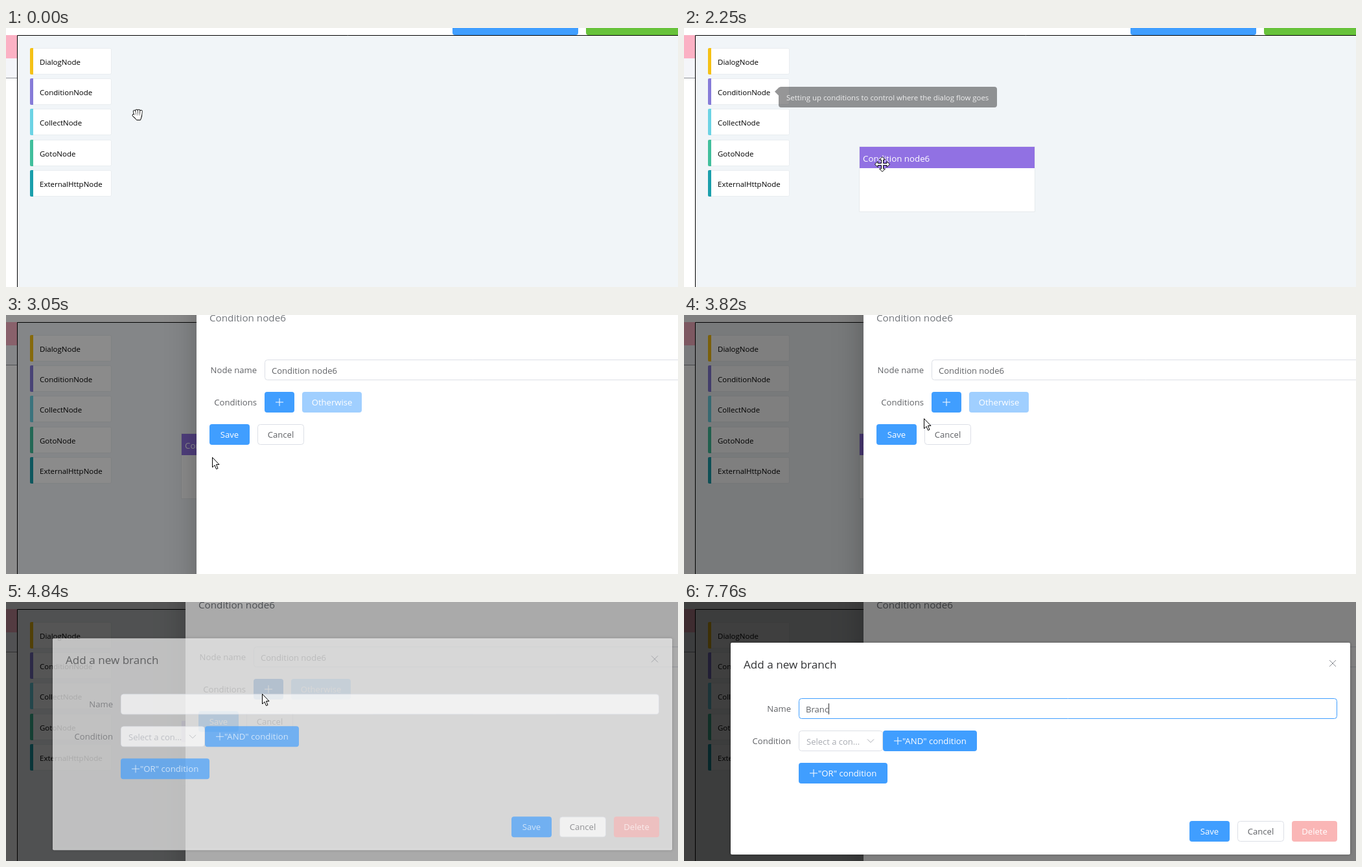
Animation of 1037x401 px, one loop 8 s. Source, as an HTML page with a canvas:

```html
<!DOCTYPE html>
<html lang="en">
<head>
<meta charset="utf-8">
<title>Flow editor</title>
<style>
html, body { margin: 0; width: 100%; height: 100%; overflow: hidden; background: #fff; }
canvas { display: block; width: 1037px; height: 401px; }
</style>
</head>
<body>
<canvas id="stage" width="1037" height="401"></canvas>
<script>
const W = 1037, H = 401, LOOP = 8000;
const ctx = document.getElementById('stage').getContext('2d');
const BLUE = '#409eff', HOVER = '#79bbff', PRESSED = '#337ecc', LINE = '#dcdfe6';
const GREY = '#606266', PALE = '#a8abb2', INK = '#303133', PURPLE = '#9171e3';
const NODES = {
  DialogNode: '#f5c116', ConditionNode: '#867bd8', CollectNode: '#6cd3e4',
  GotoNode: '#41bf9c', ExternalHttpNode: '#1a9fac'
};
const REST = { x: 197, y: 132 };
const MOVES = [
  { from: 610, to: 820, x: 155, y: 114 },
  { from: 1170, to: 1290, x: 213, y: 139 },
  { from: 1290, to: 1640, x: 272, y: 183 },
  { from: 1910, to: 2600, x: 318, y: 220 },
  { from: 3150, to: 3550, x: 334, y: 186 },
  { from: 3600, to: 4220, x: 395, y: 142 },
  { from: 4900, to: 5390, x: 339, y: 164 }
];
const TYPED_AT = [6160, 6690, 7020, 7490, 7760];

const ramp = (t, from, to) => Math.max(0, Math.min(1, (t - from) / (to - from)));
const easeOut = (u, power = 2) => 1 - (1 - u) ** power;
const between = (t, from, to) => t >= from && t < to;
const mix = (a, b, k) => a + (b - a) * k;

function rect(x, y, w, h, color) {
  ctx.fillStyle = color;
  ctx.fillRect(x, y, w, h);
}

function box(x, y, w, h, fill, border, r = 4) {
  const inset = border ? 0.5 : 0;
  ctx.beginPath();
  ctx.roundRect(x + inset, y + inset, w - 2 * inset, h - 2 * inset, r);
  ctx.fillStyle = fill;
  ctx.fill();
  if (!border) return;
  ctx.lineWidth = 1;
  ctx.strokeStyle = border;
  ctx.stroke();
}

function text(str, x, y, size, color, align = 'left') {
  ctx.font = `${size}px "Open Sans", "Noto Sans", sans-serif`;
  ctx.textAlign = align;
  ctx.fillStyle = color;
  ctx.fillText(str, x, y);
}

function line(color, width, x, y, ...rest) {
  ctx.beginPath();
  ctx.moveTo(x, y);
  for (let i = 0; i < rest.length; i += 2) ctx.lineTo(rest[i], rest[i + 1]);
  ctx.lineWidth = width;
  ctx.strokeStyle = color;
  ctx.stroke();
}

function shadowed(blur, color, paint) {
  ctx.save();
  ctx.shadowBlur = blur;
  ctx.shadowColor = color;
  paint();
  ctx.restore();
}

function plus(x, y) {
  rect(x - 6, y - 0.5, 12, 1, '#fff');
  rect(x - 0.5, y - 6, 1, 12, '#fff');
}

function button(label, x, y, w, fill, color = '#fff', border) {
  box(x, y, w, 32, fill, border);
  text(label, x + w / 2, y + 21, 13.1, color, 'center');
}

function plusButton(label, x, y, w) {
  box(x, y, w, 32, BLUE);
  plus(x + 23, y + 16);
  text(label, x + 30, y + 21, 13.2, '#fff');
}

const label = (str, right, y) => text(str, right, y + 21, 13.1, GREY, 'right');

function paletteItem(name, color, x, y) {
  box(x, y, 126, 41, '#fff', '#e9edf0', 2);
  box(x, y, 5, 41, color, null, [2, 0, 0, 2]);
  text(name, x + 15, y + 26, 11.5, '#000');
}

function page() {
  rect(0, 0, W, H, '#fff');
  rect(0, 11, 17, 36, '#fbb1c4');
  rect(0, 47, 17, 30, '#f4f5f9');
  rect(0, 77, 17, 1, '#8d9096');
  box(17, 11, W, H, '#f1f5f8', '#000', 0);
  box(689, 0, 194, 11, BLUE, null, [0, 0, 4, 4]);
  box(895, 0, 194, 11, '#67c23a', null, [0, 0, 4, 4]);
  Object.entries(NODES).forEach(([name, color], i) => {
    paletteItem(name, color, 37, Math.round(31 + 47.2 * i));
  });
}

function tooltip(t) {
  const alpha = ramp(t, 760, 900) * (1 - ramp(t, 2130, 2375));
  if (!alpha) return;
  ctx.save();
  ctx.globalAlpha = alpha;
  ctx.beginPath();
  ctx.roundRect(146, 91, 337, 32, 4);
  ctx.moveTo(140, 98.5);
  ctx.lineTo(147, 91.5);
  ctx.lineTo(147, 105.5);
  ctx.fillStyle = INK;
  ctx.fill();
  ctx.globalAlpha = alpha ** 0.25;
  text('Setting up conditions to control where the dialog flow goes', 158, 112, 11.44, '#fff');
  ctx.restore();
}

function flowNode() {
  box(270, 183, 272, 102, '#fff', '#e6eaed', 0);
  rect(271, 184, 270, 33, PURPLE);
  text('Condition node6', 276, 207, 13.3, '#fff');
}

function drawer(t) {
  const u = ramp(t, 2780, 3120);
  if (!u) return;
  rect(0, 0, W, H, `rgba(0,0,0,${0.5 * easeOut(u, 1.5)})`);
  ctx.save();
  ctx.translate(Math.round(mix(W, 277, easeOut(u, 2.4))), 0);
  shadowed(44, 'rgba(0,0,0,.26)', () => rect(0, -40, W, H + 80, '#fff'));
  text('Condition node6', 20, 10, 15.2, '#72767b');
  label('Node name', 93, 69);
  box(105, 69, W, 32, '#fff', LINE);
  text('Condition node6', 116, 91, 13, GREY);
  label('Conditions', 93, 119);
  box(105, 119, 46, 32, t >= 4630 ? PRESSED : t >= 4080 ? HOVER : BLUE);
  plus(128, 135);
  button('Otherwise', 163, 119, 92, '#a0cfff');
  button('Save', 20, 169, 62, between(t, 3450, 3760) ? HOVER : BLUE);
  button('Cancel', 94, 169, 72, '#fff', GREY, LINE);
  ctx.restore();
}

function nameField(t) {
  box(177, 149, 831, 32, '#fff', t >= 5460 ? BLUE : LINE);
  const typed = 'Branc'.slice(0, TYPED_AT.filter(at => t >= at).length);
  text(typed, 188, 171, 13.1, GREY);
  const blinkedOff = between(t, 5930, 6160) || between(t, 6480, 6690);
  if (t < 5560 || blinkedOff) return;
  rect(188 + Math.round(ctx.measureText(typed).width), 157, 1, 17, INK);
}

function branchDialog(t) {
  const k = easeOut(ramp(t, 4710, 5020));
  if (!k) return;
  rect(0, 0, W, H, `rgba(0,0,0,${0.5 * k})`);
  ctx.save();
  ctx.globalAlpha = k;
  ctx.translate(0, -20 * (1 - k));
  shadowed(4, 'rgba(0,0,0,.3)', () => box(72, 63, 956, 328, '#fff', null, 2));
  text('Add a new branch', 92, 103, 17.1, INK);
  line('#8a8d93', 1, 996, 90, 1006, 100);
  line('#8a8d93', 1, 1006, 90, 996, 100);
  label('Name', 165, 149);
  nameField(t);
  label('Condition', 165, 199);
  box(177, 199, 130, 32, '#fff', LINE);
  text('Select a con...', 189, 221, 13, PALE);
  line(PALE, 1, 283, 212.5, 288, 217.5, 293, 212.5);
  plusButton('"AND" condition', 307, 199, 145);
  plusButton('"OR" condition', 177, 249, 137);
  button('Save', 780, 339, 62, BLUE);
  button('Cancel', 854, 339, 72, '#fff', GREY, LINE);
  button('Delete', 938, 339, 70, '#fab6b6');
  ctx.restore();
}

function ghost(t) {
  if (!between(t, 1285, 1640)) return;
  const k = ramp(t, 1290, 1360);
  ctx.save();
  ctx.globalAlpha = 0.75;
  paletteItem('ConditionNode', PURPLE, Math.round(mix(95, 163, k)), Math.round(mix(103, 128, k)));
  ctx.restore();
}

function outlined(path) {
  const shape = new Path2D(path);
  ctx.fillStyle = '#fff';
  ctx.fill(shape);
  ctx.lineWidth = 1;
  ctx.strokeStyle = '#000';
  ctx.stroke(shape);
}

const arrow = () => outlined('M.5 .5v15.5l3.5-3.5 2.5 6 2.5-1-2.5-6h4.5z');

function dragArrow() {
  arrow();
  rect(3, 15, 11, 8, '#fff');
  ctx.setLineDash([1, 1]);
  ctx.strokeStyle = '#000';
  ctx.strokeRect(2.5, 15.5, 11, 8);
  ctx.setLineDash([]);
}

function moveCross() {
  for (let i = 0; i < 4; i++) {
    outlined('M-1.5 -1.5V-7h-3L0-11.5 4.5-7h-3v5.5');
    ctx.rotate(Math.PI / 2);
  }
  rect(-1.5, -1.5, 3, 3, '#fff');
}

function iBeam() {
  rect(0, -6, 1, 13, '#000');
  for (const y of [-8, 7]) {
    rect(-3, y, 3, 1, '#000');
    rect(1, y, 3, 1, '#000');
  }
}

// Each finger runs from its tip to its knuckle; the palm covers the knuckles.
function hand(fingers, palm) {
  ctx.lineCap = 'round';
  for (const finger of fingers) {
    line('#000', 4.4, ...finger);
    line('#fff', 2.4, ...finger);
  }
  outlined(palm);
  fingers.forEach(finger => line('#fff', 2.4, ...finger));
}

function openHand() {
  const fingers = [0, 1, 2, 3].map(i => [3.5 * i - 5, Math.abs(i - 1.5) - 6.5, 2.6 * i - 3, 2]);
  hand([...fingers, [-6.2, 1.2, -3, 4]], 'M-4 1H6V4L4.5 8.5h-6L-5 4z');
}

function pointingHand() {
  const fingers = [0, 1, 2, 3].map(i => [3 * i, i ? 6 + i : 2, 3 * i, 11]);
  hand([...fingers, [-4, 9, -1, 13]], 'M-1.5 10h12v4l-2 5.5h-8L-3 13z');
}

function cursorShape(t) {
  if (t < 700) return openHand;
  if (between(t, 1230, 1640)) return dragArrow;
  if (between(t, 2050, 2850)) return moveCross;
  if (between(t, 3450, 3680) || between(t, 4080, 4650)) return pointingHand;
  if (t >= 5200) return iBeam;
  return arrow;
}

function pointerAt(t) {
  if (t < 70) return { x: 203, y: 134 };
  return MOVES.reduce((at, move) => {
    const k = easeOut(ramp(t, move.from, move.to));
    return { x: mix(at.x, move.x, k), y: mix(at.y, move.y, k) };
  }, REST);
}

function pointer(t) {
  if (t >= TYPED_AT[0]) return;
  const { x, y } = pointerAt(t);
  const dragging = between(t, 1030, 1640);
  const clicking = [2500, 4550, 5460].some(at => between(t, at, at + 130));
  ctx.save();
  ctx.translate(Math.round(x), Math.round(y));
  if (dragging || clicking) {
    box(-12, -12, 24, 24, 'rgba(255,255,70,.72)', null, 12);
  }
  cursorShape(t)();
  ctx.restore();
}

function draw(t) {
  page();
  if (t >= 1910) flowNode();
  tooltip(t);
  drawer(t);
  branchDialog(t);
  ghost(t);
  pointer(t);
}

const start = performance.now();
function tick() {
  draw((performance.now() - start) % LOOP);
  requestAnimationFrame(tick);
}
tick();
</script>
</body>
</html>
```
